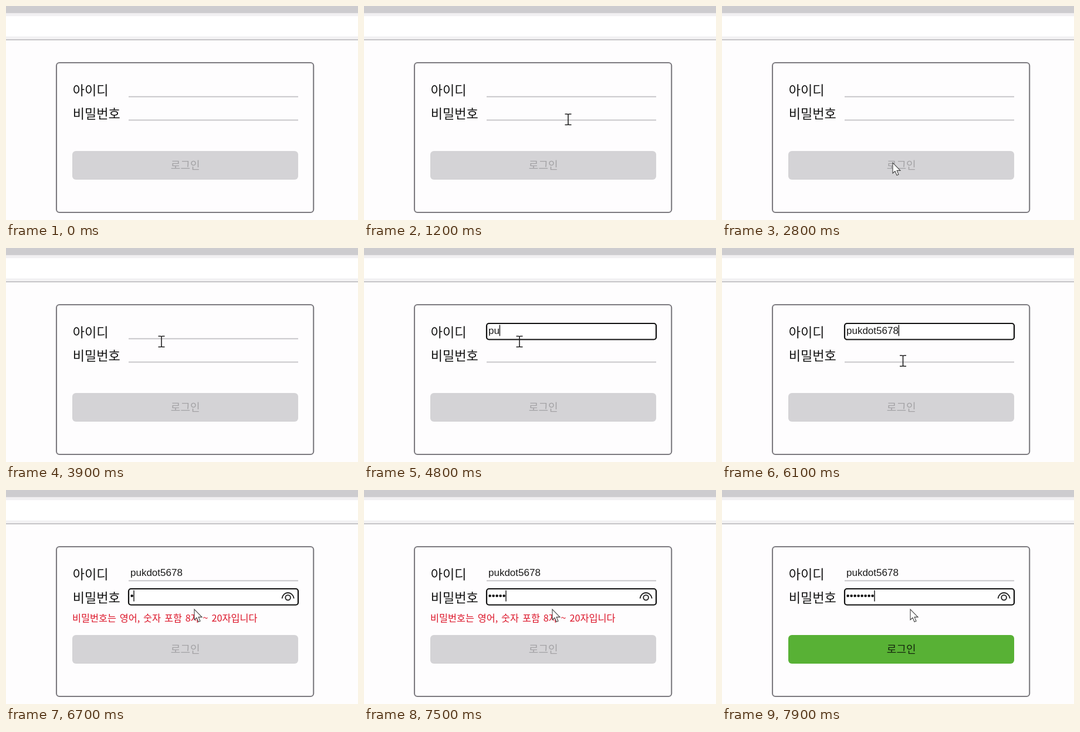
Recreate the animation shown at these times as an HTML page. Size 600 by 366 pixels, loop 8000 ms.

```html
<!DOCTYPE html>
<html lang="ko">
<head>
<meta charset="utf-8">
<style>
  html, body { margin: 0; width: 100%; height: 100%; overflow: hidden; background: #fefdfe; }
  svg { display: block; }
  text { font-family: "Noto Sans CJK KR", "Noto Sans CJK", "Noto Sans CJK JP", sans-serif; font-weight: 350; white-space: pre; }
  #idText { font-family: "Liberation Sans", Arial, sans-serif; font-weight: 400; }
  .line { fill: #cfced1; }
  .ring { fill: #fff; stroke: #111; stroke-width: 2.2; }
</style>
</head>
<body>
<svg width="600" height="366" viewBox="0 0 600 366">
  <rect width="600" height="12.5" fill="#cdcccf"/>
  <rect y="12.5" width="600" height="5" fill="#f1f0f2"/>
  <rect y="17.5" width="600" height="34.5" fill="#fff"/>
  <rect y="52" width="600" height="5" fill="#f2f1f3"/>
  <rect y="57" width="600" height="1.5" fill="#b6b5b8"/>

  <rect x="86" y="97" width="438.2" height="256" rx="5" fill="#fefdfe" stroke="#7d7b80" stroke-width="2.1"/>
  <g font-size="22" fill="#111">
    <text x="113.7" y="151.5">아이디</text>
    <text x="113.7" y="191.5">비밀번호</text>
  </g>
  <rect class="line" x="209" y="154" width="289" height="2.3"/>
  <rect class="line" x="209" y="194" width="289" height="2.3"/>
  <rect id="idRing" class="ring" x="209" y="129" width="289" height="27.5" rx="4"/>
  <rect id="pwRing" class="ring" x="209" y="169" width="289" height="27.5" rx="4"/>

  <text id="idText" x="212" y="147" font-size="17" fill="#1a1a1a"></text>
  <g id="dots" fill="#111"></g>
  <rect id="caret" width="1.4" height="19" fill="#111"/>
  <g id="eye" fill="none" stroke="#1a1a1a" stroke-width="1.8">
    <path d="M470.5 185.5C472.5 172.5 488.5 172.5 490.8 185.5"/>
    <circle cx="480.6" cy="184" r="4.3"/>
  </g>

  <text id="error" x="113" y="225.2" font-size="16.3" word-spacing="1.3" fill="#dc1428">비밀번호는 영어, 숫자 포함 8자 ~ 20자입니다</text>
  <rect id="button" x="113" y="248" width="385" height="49" rx="6"/>
  <text id="label" x="305.7" y="278.6" font-size="18" text-anchor="middle">로그인</text>

  <path id="beam" d="M-5.5-9.2H-2Q0-9.2 0-7.5Q0-9.2 2-9.2H5.5M0-8V8M-5.5 9.2H-2Q0 9.2 0 7.5Q0 9.2 2 9.2H5.5" fill="none" stroke="#222" stroke-width="1.6"/>
  <path id="arrow" d="M0 0V18L4 14.5L7 21.5L10 20.2L7.1 13.4H13Z" fill="#fff" stroke="#444" stroke-width="1.1"/>
</svg>
<script>
const LOOP = 8000, STEP = 100;
const USER = 'pukdot5678', PW_LENGTH = 8;
const POINTER_IN = 900, ID_FOCUS = 4200, CARET_ON = 4400, ID_TYPE = 4600;
const PW_FOCUS = 6200, PW_TYPE = 6600, VALID = 7700, TYPING = 1100;

// Pointer moves: begin, end, x, y
const moves = [
  [900, 1100, 380, 180], [1100, 1200, 348, 194], [1200, 1400, 303, 156], [1500, 1800, 290, 147],
  [2300, 2600, 386, 240], [2600, 2800, 291, 268], [2800, 3000, 146, 268],
  [3100, 3500, 358, 270], [3500, 3900, 265, 160], [5000, 5400, 296, 182], [5700, 6500, 321, 204]
];

const $ = id => document.getElementById(id);
const show = (id, on) => $(id).style.display = on ? '' : 'none';
const progress = (t, begin, end) => Math.min(1, Math.max(0, (t - begin) / (end - begin)));
const smooth = k => k * k * (3 - 2 * k);

// Number of characters entered; a power above 1 starts slowly
function typed(t, begin, total, power) {
  if (t < begin) return 0;
  return 1 + Math.floor((total - 1) * progress(t, begin, begin + TYPING) ** power);
}

$('dots').innerHTML = Array.from({ length: PW_LENGTH }, (_, i) =>
  `<circle cx="${214.6 + 6 * i}" cy="181" r="2.3"/>`).join('');

function drawPointer(t) {
  let x = 262, y = 128;
  for (const [begin, end, toX, toY] of moves) {
    const k = smooth(progress(t, begin, end));
    x += (toX - x) * k;
    y += (toY - y) * k;
  }
  const onField = y < 198 && x > 209;
  show('beam', t >= POINTER_IN && onField);
  show('arrow', t >= POINTER_IN && !onField);
  $(onField ? 'beam' : 'arrow').setAttribute('transform', `translate(${x} ${y})`);
}

function draw(t) {
  const idCount = typed(t, ID_TYPE, USER.length, 1);
  const pwCount = typed(t, PW_TYPE, PW_LENGTH, 1.8);
  const inPassword = t >= PW_FOCUS, valid = t >= VALID;

  show('idRing', t >= ID_FOCUS && !inPassword);
  show('pwRing', inPassword);
  $('idText').textContent = USER.slice(0, idCount);
  [...$('dots').children].forEach((dot, i) => dot.style.display = i < pwCount ? '' : 'none');
  show('eye', pwCount > 0);
  show('error', pwCount > 0 && !valid);

  show('caret', t >= CARET_ON);
  const idWidth = idCount ? $('idText').getComputedTextLength() : 0;
  $('caret').setAttribute('x', inPassword ? 211.3 + 6 * pwCount : 211.8 + idWidth);
  $('caret').setAttribute('y', inPassword ? 171.5 : 131.5);

  $('button').setAttribute('fill', valid ? '#58b135' : '#d4d3d6');
  $('label').setAttribute('fill', valid ? '#14240d' : '#a3a2a5');
  drawPointer(t);
}

function frame() {
  const t = performance.now() % LOOP;
  draw(Math.floor(t / STEP) * STEP);
  requestAnimationFrame(frame);
}
frame();
</script>
</body>
</html>
```
